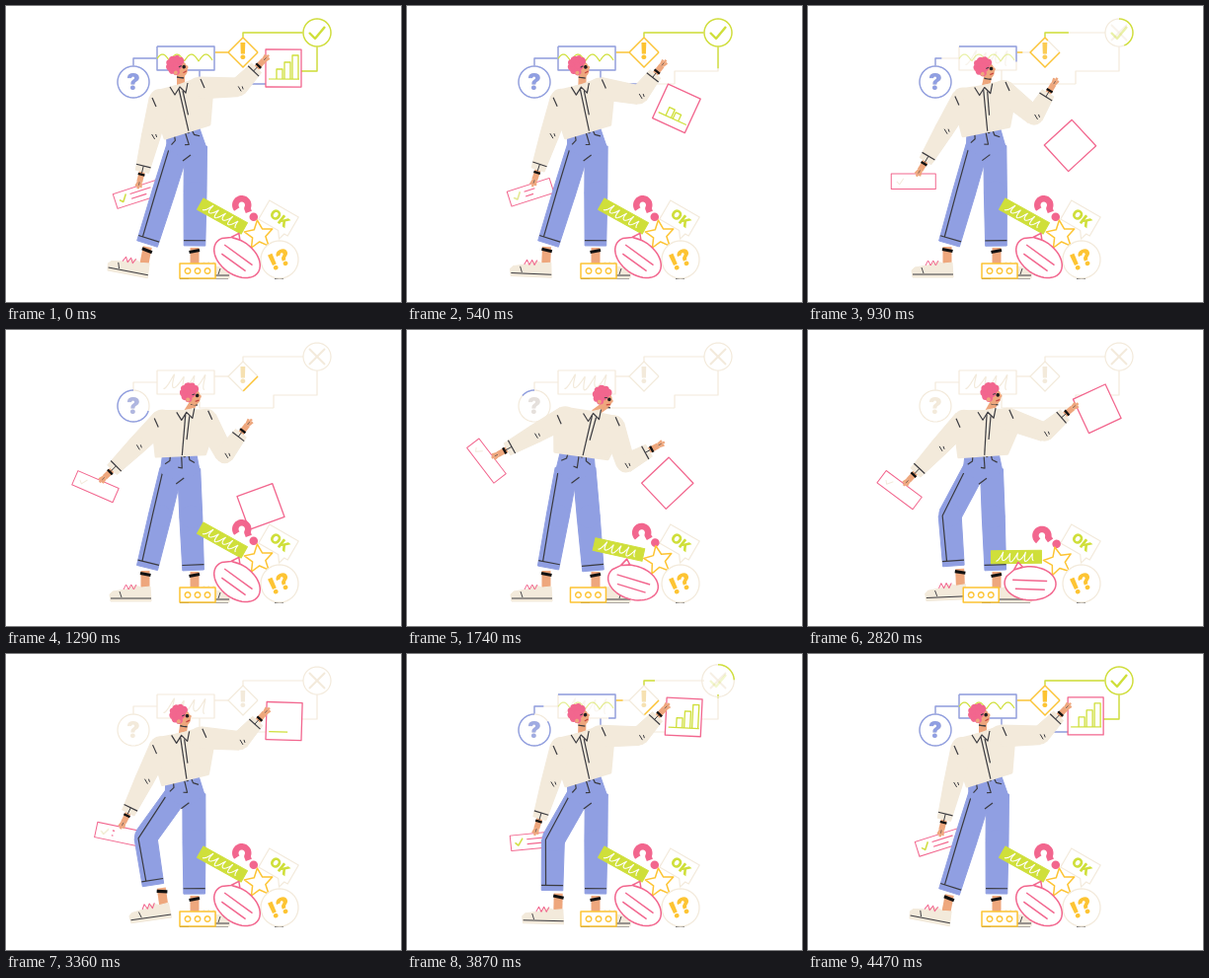
Recreate the animation shown at these times as an HTML page with a canvas. Size 400 by 300 pixels, loop 4.5 s.

```html
<!DOCTYPE html>
<html lang="en">
<head>
<meta charset="utf-8">
<title>Feedback flow</title>
<style>
html, body { margin: 0; width: 100%; height: 100%; overflow: hidden; background: #fff; }
canvas { display: block; width: 400px; height: 300px; }
</style>
</head>
<body>
<canvas></canvas>
<script>
const canvas = document.querySelector('canvas'), ctx = canvas.getContext('2d');
const ratio = window.devicePixelRatio || 1;
canvas.width = 400 * ratio;
canvas.height = 300 * ratio;

const LOOP = 4500, TURN = 2280;
const BLUE = '#909fe2', PINK = '#f2668e', LIME = '#cfdf3a', YELLOW = '#fdc433',
      BEIGE = '#f3eadb', SKIN = '#eea77d', INK = '#3b3b40', WHITE = '#fff';

const clamp = v => Math.max(0, Math.min(1, v));
const ramp = (t, start, span) => clamp((t - start) / span);
const smooth = v => v * v * (3 - 2 * v);
const onOff = (t, off, span, on, back = 500) => 1 - ramp(t, off, span) + ramp(t, on, back);
const lerp = (a, b, f) => a.map((v, i) => v + (b[i] - v) * f);
const move = (p, x, y) => [p[0] + x, p[1] + y];
const dist = (a, b) => Math.hypot(b[0] - a[0], b[1] - a[1]);
const unit = (a, b) => { const d = dist(a, b) || 1; return [(b[0] - a[0]) / d, (b[1] - a[1]) / d]; };
const normal = (a, b) => { const [x, y] = unit(a, b); return [-y, x]; };
const shift = (p, n, w) => [p[0] + n[0] * w, p[1] + n[1] * w];
const polar = (p, r, deg) => shift(p, [Math.cos(deg * Math.PI / 180), Math.sin(deg * Math.PI / 180)], r);

// Two-bone arm: elbow and fingertips follow from shoulder and wrist.
function reach(shoulder, r, deg, upper, fore, side) {
  const wrist = polar(shoulder, r, deg);
  const along = (upper ** 2 - fore ** 2 + r * r) / (2 * r);
  const out = Math.sqrt(Math.max(0, upper ** 2 - along ** 2));
  const elbow = shift(lerp(shoulder, wrist, along / r), normal(shoulder, wrist), out * side);
  return {shoulder, elbow, wrist, hand: shift(wrist, unit(elbow, wrist), 18), side};
}

function pose(t) {
  const back = ramp(t, TURN, 2070);
  const lift = t < TURN ? smooth(ramp(t, 200, 1950)) : (1 - back) ** 2;
  const sway = lift ** 1.5, step = Math.sin(Math.PI * back), raise = step ** 4;
  const bend = Math.sin(Math.PI * ramp(t, 250, 2080)) ** 2;
  const push = smooth(ramp(t, 1290, 900)) * (1 - smooth(ramp(t, 2700, 600)));
  const between = (a, b) => lerp(a, b, sway);

  const tuck = -4 * Math.sin(Math.PI * sway);
  const waistL = move(between([161,134], [150,121]), tuck, 0);
  const waistR = move(between([206,120], [205,133]), tuck, 0);
  const pelvis = between([183,140], [168,138]);
  const hipL = move(pelvis, -9, 3), hipR = move(pelvis, 9, 2);

  const toe = 1 - ramp(t, 0, 700) + ramp(t, 3700, 650);
  const foot = [141 + 18 * step, 256 - 7 * raise, 11 * toe - 8 * raise];
  const ankleL = move(foot, 2 - 12 * step, -15), ankleR = between([191,243], [188,244]);
  const kneeL = move(lerp(hipL, ankleL, 0.47), -20 * step, 0), kneeR = lerp(hipR, ankleR, 0.47);

  const armL = reach(between([156,95], [161,87]), 75 - 10 * lift * lift, 104 + 53 * lift, 34, 32, -1);
  const armR = reach(between([195,83], [212,100]), 62 - 7 * lift - 20 * bend,
                     -19 + 51 * (lift * lift + 0.45 * bend), 40, 27, 1);

  const lag = 10 * Math.sin(2 * Math.PI * t / LOOP);
  const slip = [...shift(armL.hand, unit(armL.wrist, armL.hand), 6), -18 + 87 * lift - lag];
  const tilt = 38 * lift ** 4 - 52 * lift * Math.sin(2 * Math.PI * back);
  const held = [...polar(armR.hand, 20, 41 + tilt), tilt];
  const falling = lerp([281,63,0], [258,179,70], Math.min(1, (t / 1290) ** 1.2));
  const chart = lerp(falling, held, smooth(ramp(t, 1290, 900)));

  return {
    waistL, waistR, pelvis, hipL, hipR, kneeL, kneeR, ankleL, ankleR, foot, armL, armR, slip, chart, push,
    neck: between([175,81], [190,84]),
    head: between([172,60,-22], [203,67,5])
  };
}

function trace(points, closed) {
  ctx.beginPath();
  points.forEach(p => ctx.lineTo(p[0], p[1]));
  if (closed) ctx.closePath();
}
function line(points, color = INK, width = 1.2, closed = false) {
  trace(points, closed);
  ctx.strokeStyle = color;
  ctx.lineWidth = width;
  ctx.stroke();
}
function shape(points, fill, edge = fill, width = 1) {
  trace(points, true);
  ctx.fillStyle = fill;
  ctx.fill();
  line(points, edge, width, true);
}
function disc(x, y, rx, fill, ry = rx) {
  ctx.beginPath();
  ctx.ellipse(x, y, rx, ry, 0, 0, 7);
  ctx.fillStyle = fill;
  ctx.fill();
}
function at([x, y, deg = 0], draw) {
  ctx.save();
  ctx.translate(x, y);
  ctx.rotate(deg * Math.PI / 180);
  draw();
  ctx.restore();
}
function fade(alpha, draw) {
  ctx.save();
  ctx.globalAlpha *= clamp(alpha);
  draw();
  ctx.restore();
}
function text(str, x, y, size, color) {
  ctx.font = `900 ${size}px Inter, sans-serif`;
  ctx.textAlign = 'center';
  ctx.textBaseline = 'middle';
  ctx.fillStyle = color;
  ctx.fillText(str, x, y);
}
const rect = (w, h) => [[-w / 2, -h / 2], [w / 2, -h / 2], [w / 2, h / 2], [-w / 2, h / 2]];
const plot = (n, fn) => Array.from({length: n + 1}, (_, i) => fn(i / n));
const ring = (x, y, rx, ry = rx) => plot(48, s => {
  const a = (s - 0.25) * 2 * Math.PI;
  return [x + rx * Math.cos(a), y + ry * Math.sin(a)];
});
const scribble = (w, h, turns) => plot(90, s => {
  const a = 2 * Math.PI * turns * s, y = h * Math.cos(a) * (0.8 + 0.2 * Math.sin(a * 0.6));
  return [w * (s - 0.5) - 0.4 * y + Math.sin(a), y];
});

// A pale path with its first part drawn over in colour.
function wire(points, color, part) {
  line(points, BEIGE);
  if (part <= 0) return;
  const length = points.slice(1).reduce((sum, p, i) => sum + dist(points[i], p), 0);
  ctx.setLineDash([length * part, length + 1]);
  line(points, color, 1.4);
  ctx.setLineDash([]);
}
function glyph(str, x, y, color, shown) {
  text(str, x, y, 23, BEIGE);
  fade(shown, () => text(str, x, y, 23, color));
}

function diagram(t) {
  const ask = onOff(t, 1050, 800, 3450), panel = onOff(t, 600, 600, 3600),
        alert = onOff(t, 800, 650, 3750), done = onOff(t, 650, 500, 3750),
        link = onOff(t, 250, 400, 3850);
  wire([[129,61],[129,53],[153,53]], BLUE, panel);
  wire([[196,65],[196,79],[271,79]], BLUE, onOff(t, 400, 500, 3650));
  wire([[315,41],[315,66],[271,66],[271,79]], LIME, link);
  wire([[211,47],[225,47]], YELLOW, panel);
  wire([[240,32],[240,27],[301,27]], LIME, done);

  wire(ring(129, 77, 16).reverse(), BLUE, ask);
  glyph('?', 129, 78, BLUE, ask);

  wire([[153,41],[211,41],[211,65],[153,65],[153,41]], BLUE, panel);
  fade(1 - panel, () => at([183, 53], () => line(scribble(42, 8, 4), BEIGE)));
  fade(panel, () => line(plot(60, s => [153 + 56 * s, 56 - 7 * Math.abs(Math.sin(s * 12 + 0.4))]), LIME));

  wire([[255,47],[240,62],[225,47],[240,32],[255,47]], YELLOW, alert);
  glyph('!', 240, 47, YELLOW, alert);

  const r = 14 * (1 + 0.18 * Math.sin(Math.PI * ramp(t, 3550, 500)));
  wire(ring(315, 27, r), LIME, done);
  fade(1 - done, () => {
    line([[307,19],[323,35]], BEIGE, 2);
    line([[323,19],[307,35]], BEIGE, 2);
  });
  fade(done, () => line([[307,27],[313,33],[323,21]], LIME, 2.4));
}

function limb(a, b, c, [wa, wb, wc], color) {
  const n = normal(a, b), m = normal(b, c);
  shape([shift(a, n, wa), shift(b, n, wb), shift(b, n, -wb), shift(a, n, -wa)], color);
  shape([shift(b, m, wb), shift(c, m, wc), shift(c, m, -wc), shift(b, m, -wb)], color);
  disc(...b, wb, color);
}

function arm({shoulder, elbow, wrist, hand, side}) {
  const n = normal(wrist, hand), palm = lerp(wrist, hand, 0.6);
  line([wrist, palm], SKIN, 6);
  for (const k of [-2.6, 0, 2.6])
    line([shift(palm, n, k * 0.5), shift(lerp(palm, hand, k ? 0.75 : 1), n, k)], SKIN, 2.4);
  line([palm, lerp(palm, hand, 0.5)], INK, 0.6);
  const band = lerp(wrist, hand, 0.17);
  line([shift(band, n, -3.4), shift(band, n, 3.4)], '#111', 2.4);
  disc(...shoulder, 11, BEIGE);
  limb(shoulder, elbow, wrist, [11, 9.3, 6.8], BEIGE);
  const cuff = lerp(elbow, wrist, 0.84);
  line([shift(cuff, n, -7.5), shift(cuff, n, 7.5)]);
  line([cuff, lerp(elbow, wrist, 1.05)], INK, 1);
  const fold = shift(elbow, n, 3 * side);
  line([move(fold, -2, -3), move(fold, 1, 2)], INK, 1);
  line([move(fold, 2, -3), move(fold, 3, 0)], INK, 1);
  const seam = move(shoulder, side < 0 ? -8 : 2, side < 0 ? -2 : -9);
  line([seam, move(seam, 4, 9)]);
}

function shoe(place, flip) {
  at(place, () => {
    ctx.scale(flip, 1);
    line([[0, -12], [0, 6]], SKIN, 9);
    line([[-5, -9.5], [5.5, -7.5]], '#111', 3.2);
    shape([[5,4],[6,19],[-35,19],[-36,12],[-33,9],[-20,7],[-10,3],[-4,5]], BEIGE);
    line([[-35,16],[6,16]], INK, 1);
    line([[-26,9],[-24,15]], INK, 0.9);
    line(plot(5, s => [-22 + 13 * s, s * 5 % 2 ? 2 : 7]), flip > 0 ? PINK : BEIGE, 1);
  });
}

function leg(hip, knee, ankle, seam) {
  limb(hip, knee, ankle, [11.5, 11.5, 10.8], BLUE);
  const n = normal(knee, ankle), hem = lerp(knee, ankle, 0.9);
  line([shift(hem, n, -11), shift(hem, n, 11)]);
  if (seam) line([shift(hip, normal(hip, knee), 8), shift(knee, n, 7.5), shift(hem, n, 6.5)]);
}

function legs(b) {
  line([[176,276.3],[225,276.3]], INK, 1);
  shoe([191, 257], -1);
  shoe(b.foot, 1);
  leg(b.hipR, b.kneeR, b.ankleR, false);
  leg(b.hipL, b.kneeL, b.ankleL, true);
  const across = unit(b.waistL, b.waistR), up = normal(b.waistR, b.waistL);
  const belt = x => shift(shift(b.pelvis, up, 14), across, x);
  shape([belt(-17), belt(17), move(b.hipR, 11, 2), move(b.hipR, -8, 15), move(b.hipL, 5, 11),
         move(b.hipL, -11, 2)], BLUE);
  const fly = belt(2);
  line([fly, shift(fly, up, -15), shift(belt(-2), up, -14)]);
  disc(...shift(belt(5), up, -3), 1.3, INK);
  for (const side of [-1, 1])
    line([belt(9 * side), shift(belt(10 * side), up, -7), shift(belt(15 * side), up, -10)]);
  line([move(b.pelvis, -4, 17), move(b.pelvis, 4, 11)]);
}

function torso({neck, head, armL, armR, waistL, waistR}) {
  const up = normal(armR.shoulder, armL.shoulder);
  line([move(head, 5, 9), move(neck, 2, 1)], SKIN, 8);
  line([move(head, 1, 12), move(head, 8, 13)], INK, 1.4);
  const pit = a => lerp(a.shoulder, a.elbow, 0.35);
  shape([shift(armL.shoulder, up, 9), neck, shift(armR.shoulder, up, 9), pit(armR),
         waistR, waistL, pit(armL)], BEIGE, BEIGE, 3);
  const collar = [move(neck, -9, 1), move(neck, -4, 9), move(neck, 1, 1), move(neck, 7, 7), move(neck, 9, -3)];
  shape(collar, BEIGE);
  line(collar);
  const middle = lerp(waistL, waistR, 0.53);
  line([move(neck, 0, 3), middle]);
  line([move(neck, 4, 5), lerp(move(neck, 4, 3), move(middle, 3, 0), 0.62)]);
}

function head(place) {
  at(place, () => {
    disc(3, 5, 7, SKIN, 8.5);
    disc(9, 6, 2, SKIN, 1.7);
    disc(0, -1, 7, PINK);
    for (let i = 0; i < 7; i++) disc(...polar([0, 0], 6.5, 110 + 38 * i), 3.6, PINK);
    disc(-3, 7, 2, SKIN);
    line([[2,3],[5,2.6]], INK, 1);
    disc(7, 4.5, 1.8, '#1d1d20');
    line([[4,10],[8,9.5]], '#c8453f', 1.2);
  });
}

function smallCard(place, ink) {
  at(place, () => {
    shape(rect(45, 15.5), WHITE, PINK, 1);
    line([[-17,0],[-14,3],[-10,-3]], BEIGE, 1);
    if (ink <= 0) return;
    fade(ink, () => line([[-18,0],[-15,3],[-10,-4]], LIME, 1.4));
    line([[-6,-2.5],[-6 + 22 * ink, -2.5]], PINK);
    line([[-6,2.5],[-6 + 16 * ink, 2.5]], PINK);
  });
}

function chartCard(place, ink) {
  at(place, () => {
    shape(rect(36, 38), WHITE, PINK, 1.3);
    if (ink <= 0) return;
    line([[-15,11],[-15 + 31 * Math.min(1, ink * 6), 11]], LIME);
    for (let i = 0; i < 3; i++) {
      const x = -7 + 8 * i, y = 11 - (10 + 7 * i) * ramp(ink, 0.15 + i * 0.2, 0.4);
      if (y < 11) line([[x,11],[x,y],[x + 6,y],[x + 6,11]], LIME, 1.3);
    }
  });
}

function pile(push) {
  const nudge = (rest, pushed) => lerp(rest, pushed, push);
  line([[272,276.3],[281,276.3]], INK, 1);
  at([276, 215, 30], () => {
    shape([[-17,-11],[17,-11],[17,11],[13,11],[11,18],[6,11],[-17,11]], WHITE, BEIGE, 1.2);
    at([1, 0, 8], () => text('OK', 0, 0, 14, LIME));
  });
  at(nudge([243,206,-45], [242,212,-62]), () => {
    line([...plot(20, s => polar([0, -6], 6.5, 185 + 250 * s)), [0, 4]], PINK, 6.5);
    disc(0, 11, 4.3, PINK);
  });
  at(nudge([256,232,-6], [253,235,-14]), () =>
    shape(plot(9, s => polar([0, 0], Math.round(s * 9) % 2 ? 7 : 15, 324 * s - 90)), WHITE, YELLOW, 1.5));
  shape(ring(277, 257, 19), WHITE, BEIGE, 1.3);
  at([277, 257, -24], () => text('!?', 0, 1, 23, YELLOW));
  at(nudge([219,213,29], [210,232,-4]), () => {
    shape(rect(51, 13), LIME);
    line(scribble(38, 5, 5), WHITE, 1.1);
  });
  at(nudge([234,255,36], [224,257,-2]), () => {
    const outline = ring(0, 0, 26, 17);
    outline.splice(40, 3, [-17,-13], [-13,-21], [-8,-16]);
    shape(outline, WHITE, PINK, 1.5);
    line([[-18,-3],[17,-3]], PINK, 1.5);
    line([[-15,6],[15,6]], PINK, 1.5);
  });
  at(nudge([194,268.5], [173,268.5]), () => {
    shape(rect(36, 15), WHITE, YELLOW, 1.5);
    for (const x of [-10, 0, 10]) line(ring(x, 0, 2.7), YELLOW, 1.5);
  });
}

function draw(t) {
  const b = pose(t), ink = onOff(t, 300, 500, 3300, 600);
  ctx.setTransform(ratio, 0, 0, ratio, 0, 0);
  ctx.fillStyle = WHITE;
  ctx.fillRect(0, 0, 400, 300);
  ctx.lineJoin = 'round';
  diagram(t);
  smallCard(b.slip, ink);
  legs(b);
  torso(b);
  head(b.head);
  arm(b.armL);
  chartCard(b.chart, ink);
  arm(b.armR);
  pile(b.push);
}

function tick() {
  draw(performance.now() % LOOP);
  requestAnimationFrame(tick);
}
tick();
</script>
</body>
</html>
```
